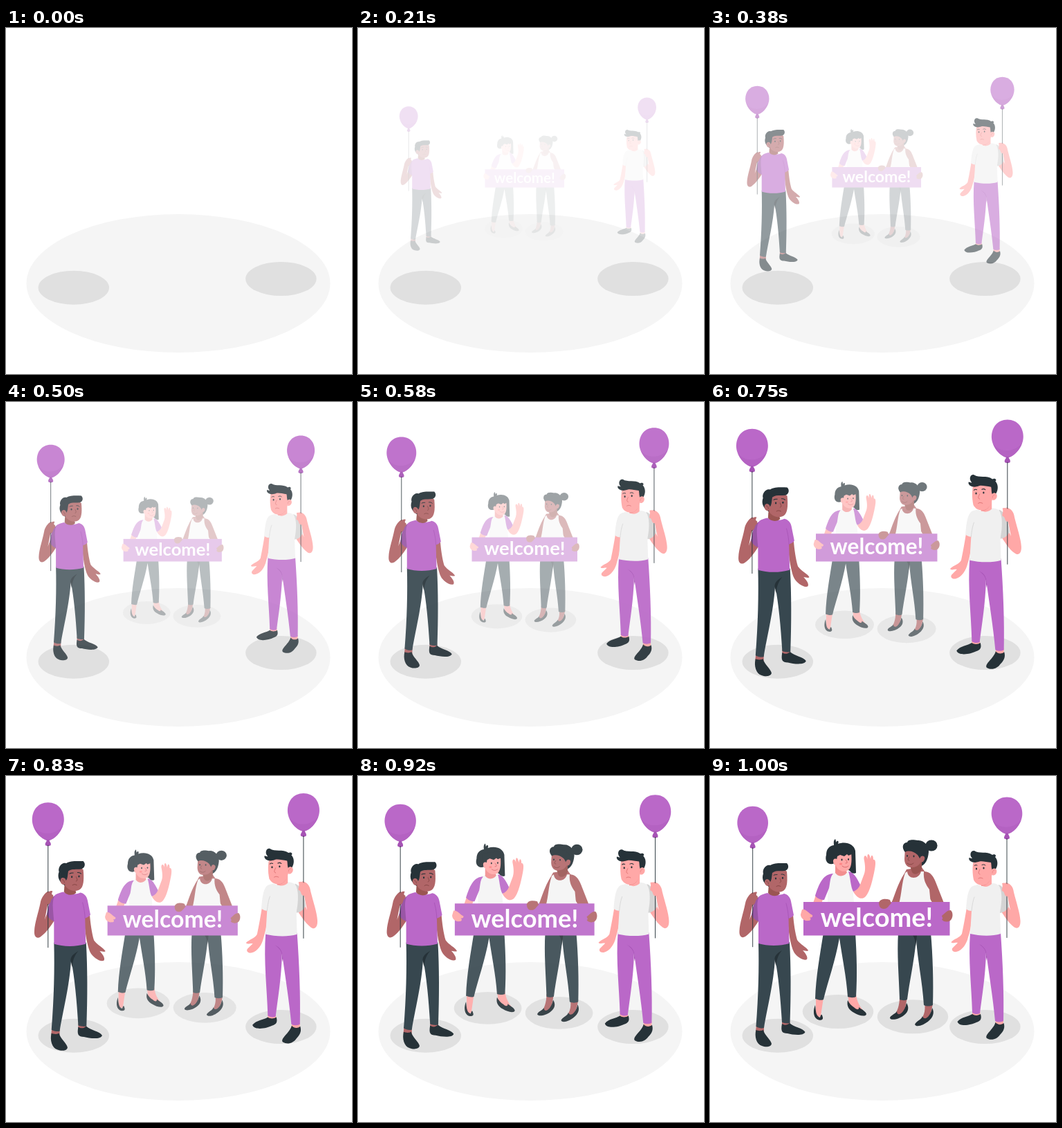
These frames come from a looping animation (500x500 px, 1040 ms). An HTML page with a canvas:

```html
<!DOCTYPE html>
<html lang="en">
<head>
<meta charset="utf-8">
<title>Welcome</title>
<style>
html, body { margin: 0; width: 100%; height: 100%; overflow: hidden; background: #fff; }
canvas { display: block; width: 500px; height: 500px; }
</style>
</head>
<body>
<canvas id="stage"></canvas>
<script>
const SIZE = 500, LOOP = 1040, FPS = 24;
const DARK = '#263238', SLATE = '#37474f', PURPLE = '#ba68c8', PALE = '#ffa8a7',
      BROWN = '#b16668', UMBER = '#9a5552', GREY = '#e0e0e0', WHITE = '#f5f5f5';

const dpr = window.devicePixelRatio || 1;
const stage = document.getElementById('stage');
const layer = document.createElement('canvas');
for (const c of [stage, layer]) c.width = c.height = SIZE * dpr;
const out = stage.getContext('2d');
const g = layer.getContext('2d');

function fill(color, d) {
  g.fillStyle = color;
  g.fill(new Path2D(d));
}
function line(color, width, d) {
  g.strokeStyle = color;
  g.lineWidth = width;
  g.lineCap = g.lineJoin = 'round';
  g.stroke(new Path2D(d));
}
function oval(color, x, y, rx, ry = rx, turn = 0, ctx = g) {
  ctx.fillStyle = color;
  ctx.beginPath();
  ctx.ellipse(x, y, rx, ry, turn, 0, Math.PI * 2);
  ctx.fill();
}

function bezier(x1, y1, x2, y2) {
  const at = (a, b, s) => 3 * (1 - s) * (1 - s) * s * a + 3 * (1 - s) * s * s * b + s * s * s;
  return x => {
    let lo = 0, hi = 1;
    for (let i = 0; i < 30; i++) {
      const mid = (lo + hi) / 2;
      if (at(x1, x2, mid) < x) lo = mid; else hi = mid;
    }
    return at(y1, y2, lo);
  };
}
const bounce = bezier(0.36, -0.01, 0.5, 1.38);
const easeIn = bezier(0.42, 0, 1, 1);

function balloon(x, y) {
  g.save();
  g.translate(x, y);
  fill(PURPLE, 'M0 0C14 0 22.3 11 22.3 24C22.3 37 12 50 2 53L-2 53C-12 50-22.3 37-22.3 24C-22.3 11-14 0 0 0Z');
  fill('#b462c2', 'M20.5 33C17 43 9 51 2 53L-2 53C-10 50-17 43-20 34C-12 46 9 47 20.5 33Z');
  fill('#a653b5', 'M-1.5 52L1.5 52C2 55 5 57 3.6 60C1 61.5-1 61.5-3.6 60C-5 57-2 55-1.5 52Z');
  line(DARK, 0.9, 'M0 60V203');
  g.restore();
}

function leftMan() {
  // raised arm
  fill(BROWN, 'M62 168C57 170 52 178 51 184C48 199 43 212 42.5 224C42 232 46 235 51 232C59 227 67 215 73 205L65 190C61 196 59 203 57 208L61 188L68 182L69 174Z');
  fill('#9a56a6', 'M74 173C66 175 62 185 60 201C63 207 68 210 73 211Z');
  balloon(61.7, 43.8);
  fill(BROWN, 'M68 168C64 166 59 171 57 177C56 182 58 187 62 186C67 185 64 180 69 177C68 174 65 175 68 168Z');
  // lowered arm
  fill(BROWN, 'M112 202L120 200C121 213 123 227 126 237C131 244 139 247 142 252C141 254 137 252 134 252C138 256 142 262 140 265C135 268 124 260 121 254C117 246 113 227 112 202Z');
  // feet
  fill(BROWN, 'M67 360H78L78 370C74 374 69 372 66 369ZM104 353H115L116 362C111 366 106 363 104 360Z');
  fill(DARK, 'M66.5 367C69 368 73 369 77 367C79 375 88 381 89 387C88 392 80 392 75 390C67 388 64 376 66.5 367ZM104 358C108 361 112 360 115 357C121 363 134 364 137.5 370C135 376 120 374 112 372C104 372 102 369 104 358Z');
  // trousers
  fill(SLATE, 'M70 240H115C117 276 117 317 115.5 357C112 358 107 357 104 356C102 322 99 290 94 264C92 300 82 338 78 364C74 365 70 364 66.5 362C70 318 71 277 70 240Z');
  fill(DARK, 'M94 268C92 262 95 257 104 252C97 260 96 268 95.5 275Z');
  // shirt
  fill(PURPLE, 'M83 169C91 173 100 173 107 170C112 171 116 175 117 181L121 201C119 204 116 205 113.5 206L114.5 242C101 246 83 246 70 242L70 211C69 194 66 181 72 173C75 171 79 170 83 169Z');
  line('#a350b2', 0.7, 'M113.5 206C113 195 111 188 110 184');
  // head
  fill(UMBER, 'M85 155L84 169C89 175 98 174 101 170L99 163Z');
  fill(BROWN, 'M85 140C93 134 108 134 111 138C112 149 112 159 108 164C103 170 92 168 87 162C84 158 84 149 85 140Z');
  fill(DARK, 'M85 160C78 156 74 149 77 141C75 135 81 127 87 129C93 125 104 126 111 126C115 130 113 136 108 137C101 138 95 136 90 140C89 147 89 152 86 154Z');
  oval(BROWN, 83, 154, 4, 5, -0.3);
  line('#7d403e', 0.7, 'M81.5 152C83.5 152 84.5 154 84.5 156');
  oval(DARK, 95, 148, 1.1, 1.5);
  oval(DARK, 105, 147.3, 1.1, 1.5);
  line(DARK, 1, 'M92 143.5C93 142.5 95 142.5 97 142.5M103 142C105 141.5 107 142.5 108 143.5');
  line('#7d403e', 0.8, 'M101 148C102 151 104 153 101 154M96 159.5C98 158 100 158.5 102 159.5');
}

function rightMan() {
  // raised arm
  fill(PALE, 'M427 154C434 155 438 160 439 168C443 184 448 198 448.5 209C449 219 444 222 439 218C431 212 425 202 419 193L427 178C430 185 432 190 434 194L430 174L422 168Z');
  fill('#d4d4d4', 'M417 157C426 160 430 173 432 188C429 194 425 197 419 198Z');
  balloon(429, 30.5);
  fill(PALE, 'M422 155C426 153 432 156 434 162C436 168 435 174 430 174C424 174 427 167 422 166C421 163 424 161 422 155Z');
  // lowered arm
  fill(PALE, 'M371 190L379 193C379 207 377 221 373 233C371 242 365 252 356 254C351 255 348 251 351 248L358 241C355 240 350 243 348.5 240C353 235 361 234 364 228C367 214 369 202 371 190Z');
  // feet
  fill(PALE, 'M379 340H390L391 347C388 351 382 350 379 346ZM413 352H424L424 362C419 366 415 363 412 359Z');
  fill(DARK, 'M379 344C383 347 388 346 391 344C393 351 391 354 385 356C377 360 360 363 357.5 355C363 348 373 348 379 344ZM412.5 356C416 360 421 360 424.5 357C427 365 423 370 419 374C415 380 407 383 400 379C396 374 410 366 412.5 356Z');
  // trousers
  fill(PURPLE, 'M376 226L420 226C423 269 425 314 424 354C420 356 416 356 412 354C409 321 403 285 399 255C398 290 393 318 390 343C386 345 382 344 379 342C378 304 373 266 376 226Z');
  fill('#a350b2', 'M399 262C400 253 396 248 389 243C397 247 401 253 400 267Z');
  // shirt
  fill('#f0f0f0', 'M387 157C394 161 402 160 407 155C412 155 417 156 419 161C423 171 421 188 419 197L420 228C407 232 389 231 376 228L378 195C375 195 372 194 370 192C371 180 372 167 377 161C380 158 384 158 387 157Z');
  line('#cfcfcf', 0.7, 'M378 195C379 186 380 180 382 175');
  // head
  fill(PALE, 'M391 151L391 157C396 162 403 160 407 156L407 141Z');
  fill('#f28f8f', 'M392 157C398 157 403 153 405 149C403 155 398 159 392 159Z');
  fill(PALE, 'M381 122C390 117 405 120 409 128C409 140 407 150 400 156C393 160 384 157 381 150C379 141 379 130 381 122Z');
  fill(DARK, 'M383 125C378 125 373 122 374.5 118C377 119 379 119 379 119C374 114 377 107 382 108C389 113 400 108 408 114C411 112 415 115 412 117C416 121 417 129 412 136L408.5 137C406 133 407 129 406 125C399 124 391 122 388 124Z');
  oval(PALE, 410, 138.5, 4.2, 5.2, 0.4);
  line('#e57f80', 0.7, 'M411 136C409 136 408 138 408 140');
  oval(DARK, 385, 134, 1.1, 1.5);
  oval(DARK, 395.5, 133, 1.1, 1.5);
  line(DARK, 1, 'M382 129.5C383 128.5 385 128.5 386 129M393 128.5C395 127.5 397 128 398 129');
  line('#d96a6c', 0.8, 'M390 135C388 139 387 141 390 142M388 148C390 146.5 392 147 394 148');
}

function leftGirl() {
  // legs
  fill(PALE, 'M153 318L164 320L160 347L153 350ZM199 315L211 315C212 326 217 334 223 341L216 344L201 330Z');
  fill(DARK, 'M152 331C149 338 149 347 154 351C158 354 164 353 163 349C162 345 161 342 159 349C153 347 153 340 152 331ZM199 324C197 333 201 338 208 342C214 346 225 349 226 344C225 340 220 338 215 334C216 338 212 338 209 335C204 332 201 328 199 324Z');
  fill(SLATE, 'M164 226H210C212 259 213 288 211 319C207 321 202 320 199 319C197 289 191 263 187 234C181 268 170 298 164 323C160 325 156 323 152 322C153 290 159 258 164 226Z');
  // arms
  fill(PALE, 'M153 171L164 176L157 195H143C148 187 151 179 153 171Z');
  fill(PALE, 'M210 165L217 157L223 141C225 135 224 127 222.5 120C222 114 226 113 228 121C226 112 230 109 232 120C233 112 236 114 236 121C239 120 240 125 238 135C235 151 231 167 225 174C219 180 212 176 207 167Z');
  // top
  fill(WHITE, 'M181 139C187 143 194 142 199 138L205 143L208 184H170L170 145Z');
  fill(PURPLE, 'M178 141C165 142 159 151 152 173C155 177 160 179 165 179L172 162C174 153 173 147 178 141Z');
  fill(PURPLE, 'M200 138C207 138 212 147 217 157C215 162 212 165 207 167C203 160 203 146 200 138Z');
  // head
  fill(DARK, 'M179 100C179 96 178 94 181 91C182 93 182 95 182 96C184 92 187 94 185 98C196 94 208 98 210 108L211 140C208 142 204 140 202 137L180 126C172 130 165 124 168 114C168 106 172 101 179 100Z');
  fill('#f28f8f', 'M181 128V140C186 147 195 145 198 139L193 132Z');
  fill(PALE, 'M180 111C189 110 198 113 204 110C205 120 205 130 201 135C194 141 184 137 181 128Z');
  fill(DARK, 'M178 106L204 103L205 113L200 115L198 113L194 116L188 114L184 116L183 121L178 124Z');
  oval(PALE, 181.5, 124, 3.4, 4.6, -0.2);
  oval(DARK, 190.5, 121, 1, 1.4);
  oval(DARK, 200, 120.5, 1, 1.4);
  oval('#ff8586', 189, 127, 2.2, 1.5);
  line('#cf5a60', 0.8, 'M196 121C198 124 200 126 196 126M191 130C194 133 198 132 200 130');
}

function rightGirl() {
  // legs
  fill(BROWN, 'M274 319H285C283 331 282 341 275 347L263 350C271 342 274 331 274 319ZM310 328H322C320 342 317 350 308 357L299 359C309 349 312 340 310 328Z');
  fill(DARK, 'M284 328C288 334 287 341 280 346C274 351 262 354 260 350C260 346 268 344 270 340C270 348 280 345 284 328ZM321 335C325 342 322 349 316 354C309 360 298 364 296 359C298 354 306 352 307 347C310 355 319 347 321 335Z');
  fill(SLATE, 'M272 226H319C322 260 323 298 322 331C318 333 313 333 309 331C307 297 300 267 298 236C295 268 288 298 285 323C281 325 277 324 274 323C273 288 270 258 272 226Z');
  fill(DARK, 'M298 240L299 230H293C296 234 297 240 297 246Z');
  // arms
  fill(BROWN, 'M282 140C275 148 269 165 264 179L259 190H271L283 167Z');
  fill(BROWN, 'M307 138C317 137 322 143 326 153L339 186H323L308 161Z');
  // top
  fill(BROWN, 'M284 135L306 132L314 143L309 165H277L277 148Z');
  fill(WHITE, 'M282 140L285 138C286 150 302 150 305 138L309 138C308 150 312 157 317 164L319 185H273C277 171 277 154 282 140Z');
  // head
  oval(DARK, 320, 100.5, 8.6, 8);
  fill(DARK, 'M282 110C276 103 279 96 285 96C286 91 295 92 300 93C309 92 317 101 316 110C315 121 311 129 303 131L286 120Z');
  fill(UMBER, 'M288 127L292 139C296 145 304 140 306 134L306 119Z');
  fill(BROWN, 'M282 104C291 104 302 108 307 114C307 125 301 132 292 132C285 133 281 127 281 120Z');
  fill(DARK, 'M279 103C287 97 306 98 312 114L309 125C304 125 304 119 300 114C295 109 287 107 282 110Z');
  oval(BROWN, 306.5, 120, 3.5, 4.6, 0.4);
  oval(DARK, 285, 115.5, 1, 1.4);
  oval(DARK, 294.5, 116, 1, 1.4);
  line('#7d403e', 0.8, 'M288 117C286 120 285 122 288 122M285 126C288 129 292 128 294 126');
}

function pair() {
  oval(GREY, 185, 340.5, 51.2, 24.5);
  oval(GREY, 293, 347.8, 51.2, 24.5);
  leftGirl();
  rightGirl();
  g.fillStyle = PURPLE;
  g.fillRect(135, 182, 211.5, 48.5);
  g.fillStyle = '#fff';
  g.font = '700 38px Lato, "Open Sans", sans-serif';
  g.textAlign = 'center';
  g.textBaseline = 'alphabetic';
  g.fillText('welcome!', 241, 218);
  // hands on the sign
  fill(PALE, 'M133 193C138 191 142 198 148 201C149 204 146 205 144 204C147 207 145 209 142 209C137 210 131 206 131 200Z');
  fill(BROWN, 'M244 183C246 177 254 177 260 179L262 184C258 187 257 192 251 192C246 192 244 188 244 183Z');
  fill(BROWN, 'M348 194C352 198 351 206 347 209C342 212 336 210 335 207C338 206 335 204 335 202C339 199 342 194 348 194Z');
}

// Draws a group scaled about a point and fades it in as one.
function zoomIn(p, cx, cy, draw) {
  const s = 0.5 + 0.5 * p;
  g.setTransform(1, 0, 0, 1, 0, 0);
  g.clearRect(0, 0, layer.width, layer.height);
  g.setTransform(dpr * s, 0, 0, dpr * s, dpr * cx * (1 - s), dpr * cy * (1 - s));
  draw();
  out.globalAlpha = Math.max(0, Math.min(1, p));
  out.drawImage(layer, 0, 0, SIZE, SIZE);
  out.globalAlpha = 1;
}

function render(ms) {
  out.setTransform(dpr, 0, 0, dpr, 0, 0);
  out.fillStyle = '#fff';
  out.fillRect(0, 0, SIZE, SIZE);
  oval('#f5f5f5', 249, 369, 219.5, 100, 0, out);
  oval(GREY, 97.8, 375.2, 51.2, 24.5, 0, out);
  oval(GREY, 397.4, 362.5, 51.2, 24.5, 0, out);

  // 24 steps a second, each starting on a 10 ms tick
  const tick = Math.floor(ms / 10) * 10;
  const step = Math.floor((tick + 4.99) * FPS / 1000);
  if (step < 3) return;
  const t = Math.min(1, (step + 0.65) / FPS);
  zoomIn(easeIn(t), 240.7, 230.5, pair);
  zoomIn(bounce(t), 90.5, 217.5, leftMan);
  zoomIn(bounce(t), 400.5, 205.5, rightMan);
}

const start = performance.now();
function loop() {
  render((performance.now() - start) % LOOP);
  requestAnimationFrame(loop);
}
loop();
</script>
</body>
</html>
```
